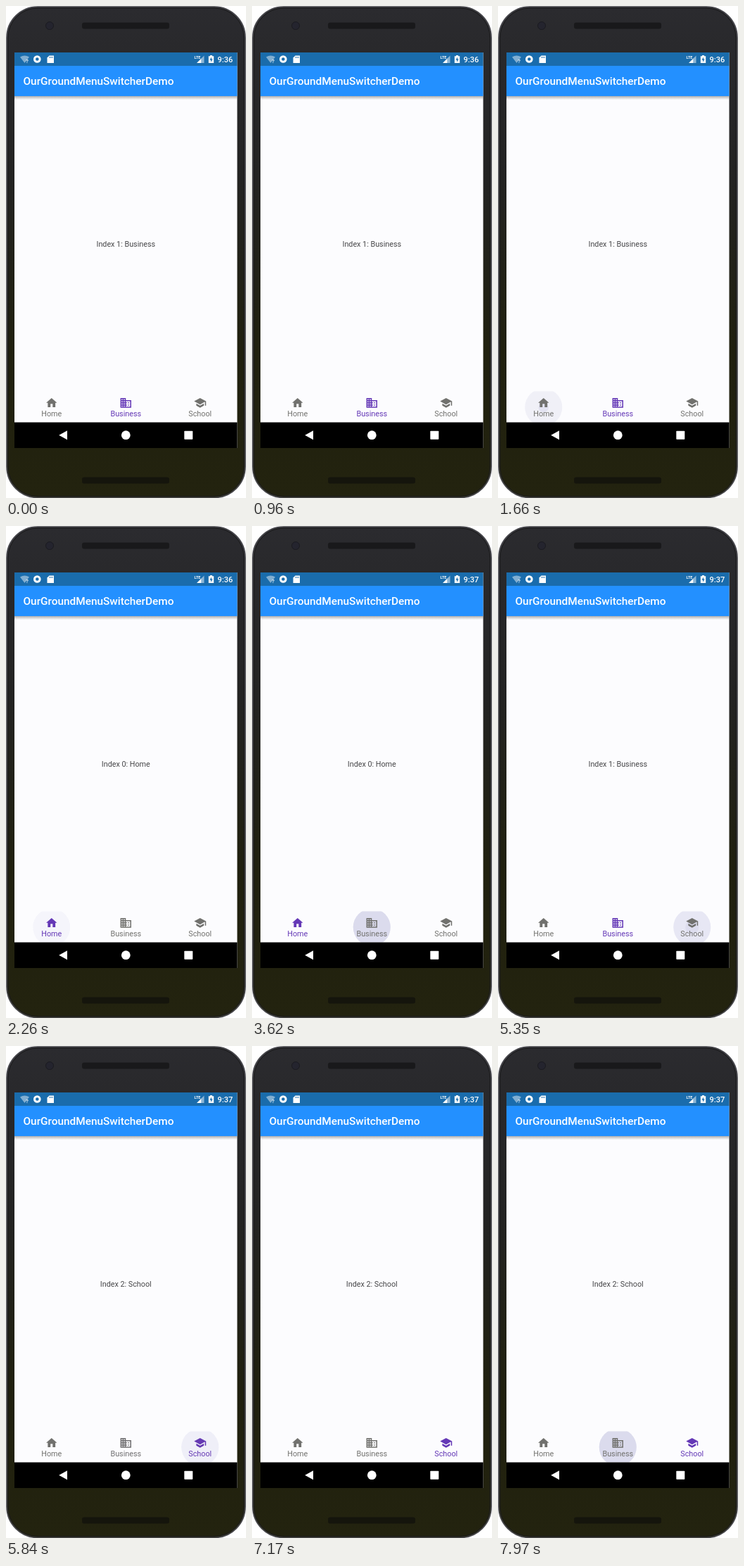
These frames come from a looping animation (341 px wide and 699 px high, 8 s). An HTML page:

```html
<!DOCTYPE html>
<html lang="en">
<head>
<meta charset="utf-8">
<title>Tab bar demo</title>
<style>
  html, body { margin: 0; width: 100%; height: 100%; overflow: hidden; }
  svg { display: block; width: 100vw; height: 100vh; }
  text { font: 10.77px Roboto, Arial, sans-serif; }
  .mid { text-anchor: middle; }
  .title { font-size: 15.38px; font-weight: 500; fill: #fff; }
  .clock { font-size: 11px; font-weight: 500; fill: #fff; }
  .lte { font-size: 5.5px; font-weight: 700; fill: #fff; }
</style>
</head>
<body>
<svg viewBox="0 0 341 699">
  <defs>
    <linearGradient id="shell" x2="0" y2="1">
      <stop offset="0" stop-color="#2b2b2f"/>
      <stop offset=".35" stop-color="#232322"/>
      <stop offset=".7" stop-color="#20200e"/>
      <stop offset="1" stop-color="#23230f"/>
    </linearGradient>
    <linearGradient id="shade" x2="0" y2="1">
      <stop offset="0" stop-color="#777" stop-opacity=".6"/>
      <stop offset="1" stop-color="#999" stop-opacity="0"/>
    </linearGradient>
    <clipPath id="bar"><rect x="12" y="547.5" width="316.5" height="44"/></clipPath>
  </defs>

  <!-- phone -->
  <rect x="1" y="1" width="339" height="697.5" rx="44" fill="url(#shell)" stroke="#47474c" stroke-width="1.6"/>
  <rect x="3" y="3" width="335" height="693.5" rx="42" fill="none" stroke="#1b1b1c"/>
  <circle cx="62" cy="28" r="5.5" fill="#24242e" stroke="#1b1b20"/>
  <rect x="108" y="23.5" width="124" height="9" rx="3" fill="#19191b"/>
  <rect x="108" y="669.5" width="124" height="9" rx="3" fill="#15150c"/>

  <!-- screen -->
  <rect x="12" y="66" width="316.5" height="562" fill="#fcfcfe"/>
  <rect x="12" y="128" width="316.5" height="5.5" fill="url(#shade)"/>
  <rect x="12" y="66" width="316.5" height="19.5" fill="#1a6cac"/>
  <rect x="12" y="85" width="316.5" height="43" fill="#2390ff"/>
  <text class="title" x="24.5" y="112">OurGroundMenuSwitcherDemo</text>

  <!-- status icons -->
  <g fill="#fff">
    <path d="M20 72.5Q26.5 68.5 33 72.5L26.5 81Z" opacity=".45"/>
    <text x="28" y="81" style="font-size:8px;font-weight:700" opacity=".8">?</text>
    <circle cx="44.3" cy="75.5" r="5.3"/>
    <circle cx="44.3" cy="75.5" r="2.3" fill="#1a6cac"/>
    <path d="M61.5 70.5H68V81H58.5V73.5Z"/>
    <path d="M62 72v2M64 72v2M66 72v2" stroke="#1a6cac" stroke-width=".9"/>
    <text class="lte" x="267.5" y="74.5">LTE</text>
    <path d="M271 81L277.5 74.5V81Z"/>
    <path d="M277.5 74.5L281.5 70.5V81H277.5Z" opacity=".5"/>
    <path d="M290 70h3v1.2h2.2V81h-7.4V71.2H290Z"/>
    <path d="M292 72.5L289.5 76.8H291.2V79.8L293.7 75.5H292Z" fill="#1a6cac"/>
  </g>
  <text class="clock" id="clock" x="300.5" y="79.8"></text>

  <text class="mid" id="page" x="170.25" y="342" fill="#464648"></text>

  <g id="tabs"></g>

  <!-- system keys -->
  <rect x="12" y="591.5" width="316.5" height="36.5" fill="#000"/>
  <g fill="#fff">
    <path d="M75.2 609.7L87 603.2V616.2Z"/>
    <circle cx="170.3" cy="609.7" r="6.4"/>
    <rect x="253.3" y="603.7" width="12" height="12" rx=".8"/>
  </g>
</svg>
<script>
const LOOP = 8000, RADIUS = 26.5, FADE = 200, GROW = 700;
const GREY = [113, 113, 110], PURPLE = [100, 56, 182];

const items = [
  { name: 'Home', icon: 'M10 20v-6h4v6h5v-8h3L12 3 2 12h3v8z' },
  { name: 'Business', icon: 'M12 7V3H2v18h20V7H12zM6 19H4v-2h2v2zm0-4H4v-2h2v2zm0-4H4V9h2v2zm0-4H4V5h2v2zm4 12H8v-2h2v2zm0-4H8v-2h2v2zm0-4H8V9h2v2zm0-4H8V5h2v2zm10 12h-8v-2h2v-2h-2v-2h2v-2h-2V9h8v10zm-2-8h-2v2h2v-2zm0 4h-2v2h2v-2z' },
  { name: 'School', icon: 'M5 13.18v4L12 21l7-3.82v-4L12 17l-7-3.82zM12 3L1 9l11 6 9-4.91V17h2V9L12 3z' }
];

const taps = [
  { tab: 0, down: 1560, up: 2090 },
  { tab: 1, down: 2820, up: 3760 },
  { tab: 2, down: 5180, up: 5710 },
  { tab: 1, down: 7180, up: LOOP }
];

const byId = id => document.getElementById(id);
const clamp = v => Math.max(0, Math.min(1, v));
const mix = k => `rgb(${GREY.map((g, i) => Math.round(g + (PURPLE[i] - g) * k))})`;

function add(parent, tag, attrs) {
  const el = document.createElementNS('http://www.w3.org/2000/svg', tag);
  for (const key in attrs) el.setAttribute(key, attrs[key]);
  return parent.appendChild(el);
}

items.forEach((item, i) => {
  const x = 64.75 + 105.5 * i, s = 10 / 13;
  const ink = add(byId('tabs'), 'g', { 'clip-path': 'url(#bar)' });
  item.glow = add(ink, 'circle', { cx: x, cy: 570, r: RADIUS, fill: '#bebede' });
  item.splash = add(ink, 'circle', { cx: x, cy: 570, fill: '#cccce4' });
  item.face = add(byId('tabs'), 'g', {});
  add(item.face, 'path', { d: item.icon, transform: `translate(${x - 12 * s} 554.6) scale(${s})` });
  add(item.face, 'text', { x, y: 583, class: 'mid' }).textContent = item.name;
});

function draw(t) {
  let current = 1, previous = 1, since = -FADE;
  const inks = items.map(() => ({ glow: 0, splash: 0, r: 0 }));

  for (const { tab, down, up } of taps) {
    if (t < down) break;
    const out = 1 - clamp((t - up) / FADE);
    const held = clamp((Math.min(t, up) - down) / GROW);
    const size = Math.max(held, clamp(held + (t - up) / 100));
    if (out > 0) inks[tab] = {
      glow: 0.4 * out * clamp((t - down) / FADE),
      splash: 0.4 * out,
      r: 4 + (RADIUS - 4) * size
    };
    if (t >= up) {
      previous = current;
      current = tab;
      since = up;
    }
  }

  // Selected and deselected tabs cross-fade, easing out
  const k = 1 - (1 - clamp((t - since) / FADE)) ** 3;
  items.forEach((item, i) => {
    const tint = i === current ? (previous === current ? 1 : k) : i === previous ? 1 - k : 0;
    item.face.setAttribute('fill', mix(tint));
    item.glow.setAttribute('opacity', inks[i].glow);
    item.splash.setAttribute('opacity', inks[i].splash);
    item.splash.setAttribute('r', inks[i].r);
  });
  byId('page').textContent = `Index ${current}: ${items[current].name}`;
  byId('clock').textContent = t < 2790 ? '9:36' : '9:37';
}

const start = performance.now();
function tick() {
  draw((performance.now() - start) % LOOP);
  requestAnimationFrame(tick);
}
tick();
</script>
</body>
</html>
```
